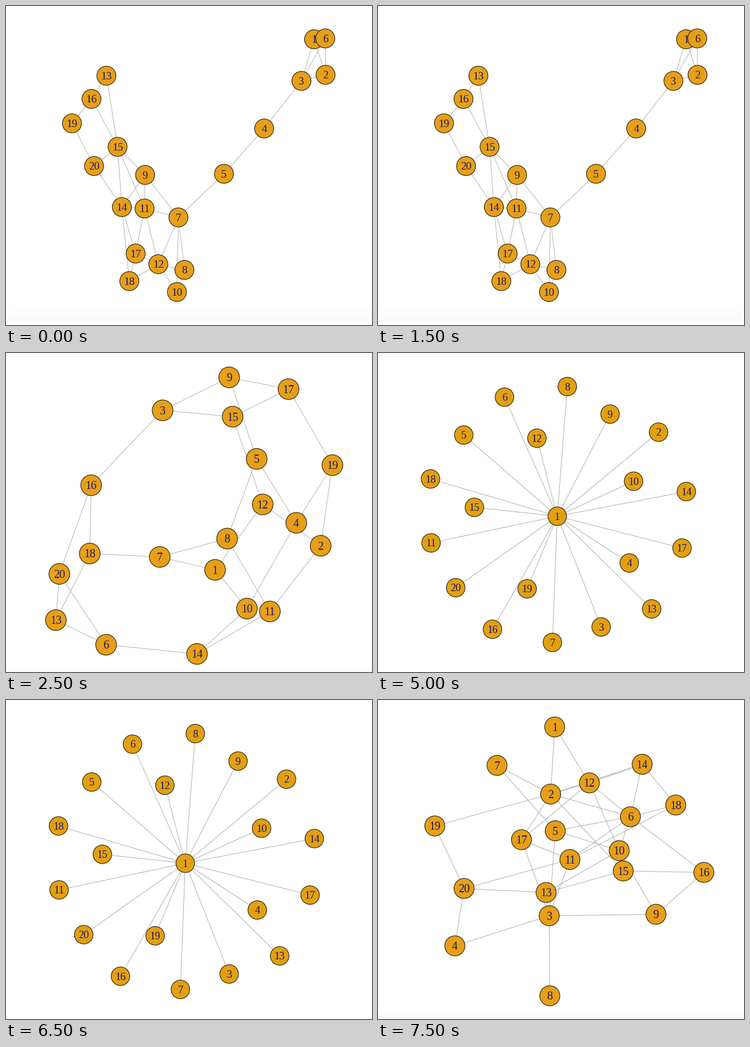
A matplotlib script for the animation above (10000 ms loop, 638 by 556 pixels).

```python
import numpy as np
import matplotlib.pyplot as plt
from matplotlib.animation import FuncAnimation
from matplotlib.collections import LineCollection
from matplotlib.patches import Circle

W, H, DPI = 638, 556, 64
PX = 72 / DPI  # points per pixel

# Node positions in label order, then neighbours of each node.
chain = dict(
    radius=16.6, font=19, fill="#e69f17", edge="#b9b9b9", width=1.1,
    shade=(5, 633, 518, 549),
    nodes=[(537, 58), (557, 120), (515, 130.5), (450, 213.5), (380, 292.5),
           (556.5, 56.5), (300.5, 368.5), (311, 460), (242.5, 294.5), (298, 498.5),
           (241.5, 353), (265.5, 450), (175, 121.5), (202, 350.5), (194.5, 245.5),
           (149, 162), (226, 431.5), (215, 479.5), (115, 204.5), (153.5, 279)],
    links={1: [2, 3, 6], 2: [3, 6], 3: [4, 6], 4: [5], 5: [7],
           7: [8, 9, 10, 11, 12], 8: [10, 12], 9: [11, 14, 15], 10: [12],
           11: [12, 14, 15, 17], 12: [17, 18], 13: [15, 16],
           14: [15, 17, 18, 20], 15: [16, 20], 16: [19], 17: [18], 19: [20]})

cubic = dict(
    radius=18.1, font=20, fill="#e69f17", edge="#b9b9b9", width=1.1,
    shade=(0, 638, 546, 556),
    nodes=[(364.5, 378), (548.5, 336), (273, 100), (506, 296), (437, 184.5),
           (174.5, 508.5), (268, 355.5), (385.5, 323.5), (389, 42.5), (420, 445.5),
           (460, 450.5), (447.5, 264), (87, 465.5), (333, 524.5), (395, 111),
           (148.5, 230.5), (492.5, 63), (146, 349.5), (569, 195.5), (93, 385)],
    links={1: [7, 10, 12], 2: [11, 12, 19], 3: [9, 15, 16], 4: [5, 10, 19],
           5: [8, 9], 6: [13, 14, 20], 7: [8, 18], 8: [11], 9: [17],
           10: [14], 11: [14], 12: [15], 13: [18, 20], 15: [17],
           16: [18, 20], 17: [19]})

star = dict(
    radius=16.2, font=18.5, fill="#e2a00f", edge="#a6a6a6", width=0.9,
    shade=None,
    nodes=[(312.5, 284.5), (489, 138), (389, 477.5), (438, 366), (149.5, 143),
           (220.5, 77), (304, 504.5), (330, 58.5), (404.5, 106.5), (445.5, 223.5),
           (92.5, 331), (277, 148.5), (477, 446), (537.5, 241.5), (168, 269),
           (199.5, 481.5), (530, 340), (91.5, 219.5), (260, 411), (135.5, 409)],
    links={1: range(2, 21)})

scatter = dict(
    radius=17.5, font=20, fill="#e69f17", edge="#b4b4b4", width=1.1,
    shade=(0, 638, 538, 556),
    nodes=[(308, 47), (301, 164), (298.5, 376), (134, 428.5), (309, 228),
           (440, 203.5), (207.5, 114), (299.5, 515.5), (484.5, 373.5), (420.5, 262.5),
           (334.5, 278), (368.5, 144.5), (293, 335.5), (460.5, 112), (427.5, 298),
           (568, 300.5), (250, 243.5), (519, 183), (99, 219.5), (150, 328.5)],
    links={1: [2, 12], 2: [6, 7, 12, 14, 15, 17, 19], 3: [4, 5, 8, 9, 11, 13, 17],
           4: [20], 5: [6, 7, 10], 6: [10, 11, 12, 14, 16, 18], 9: [10, 16],
           10: [12, 13], 11: [17, 18, 20], 12: [14, 17], 13: [15, 20],
           14: [18], 15: [16], 19: [20]})

GRAPHS = [chain, cubic, star, scatter]

fig = plt.figure(figsize=(W / DPI, H / DPI), dpi=DPI, facecolor="white")
ax = fig.add_axes([0, 0, 1, 1])


def draw_shade(box):
    """Faint grey fade along the bottom edge."""
    left, right, top, bottom = box
    fade = np.linspace(1, 0.977, 32)[:, None]
    ax.imshow(fade, cmap="gray", vmin=0, vmax=1, aspect="auto",
              extent=(left, right, bottom, top), interpolation="bilinear", zorder=0)


def draw_graph(graph):
    nodes = graph["nodes"]
    segments = [(nodes[a - 1], nodes[b - 1])
                for a, near in graph["links"].items() for b in near]
    ax.add_collection(LineCollection(segments, colors=graph["edge"],
                                     linewidths=graph["width"] * PX, zorder=1))
    for label, (x, y) in enumerate(nodes, 1):
        ax.add_patch(Circle((x, y), graph["radius"], facecolor=graph["fill"],
                            edgecolor="#2b2414", linewidth=1.15 * PX,
                            zorder=2 + label))
        ax.text(x, y + 0.33 * graph["font"], str(label), ha="center",
                va="baseline", family="Liberation Serif", color="#1c1464",
                fontsize=graph["font"] * PX, zorder=2 + label)


def update(index):
    ax.clear()
    graph = GRAPHS[index]
    if graph["shade"]:
        draw_shade(graph["shade"])
    draw_graph(graph)
    ax.set(xlim=(0, W), ylim=(H, 0))
    ax.axis("off")
    return []


anim = FuncAnimation(fig, update, frames=len(GRAPHS), interval=2500,
                     repeat=True, repeat_delay=0, blit=False)
plt.show()
```
